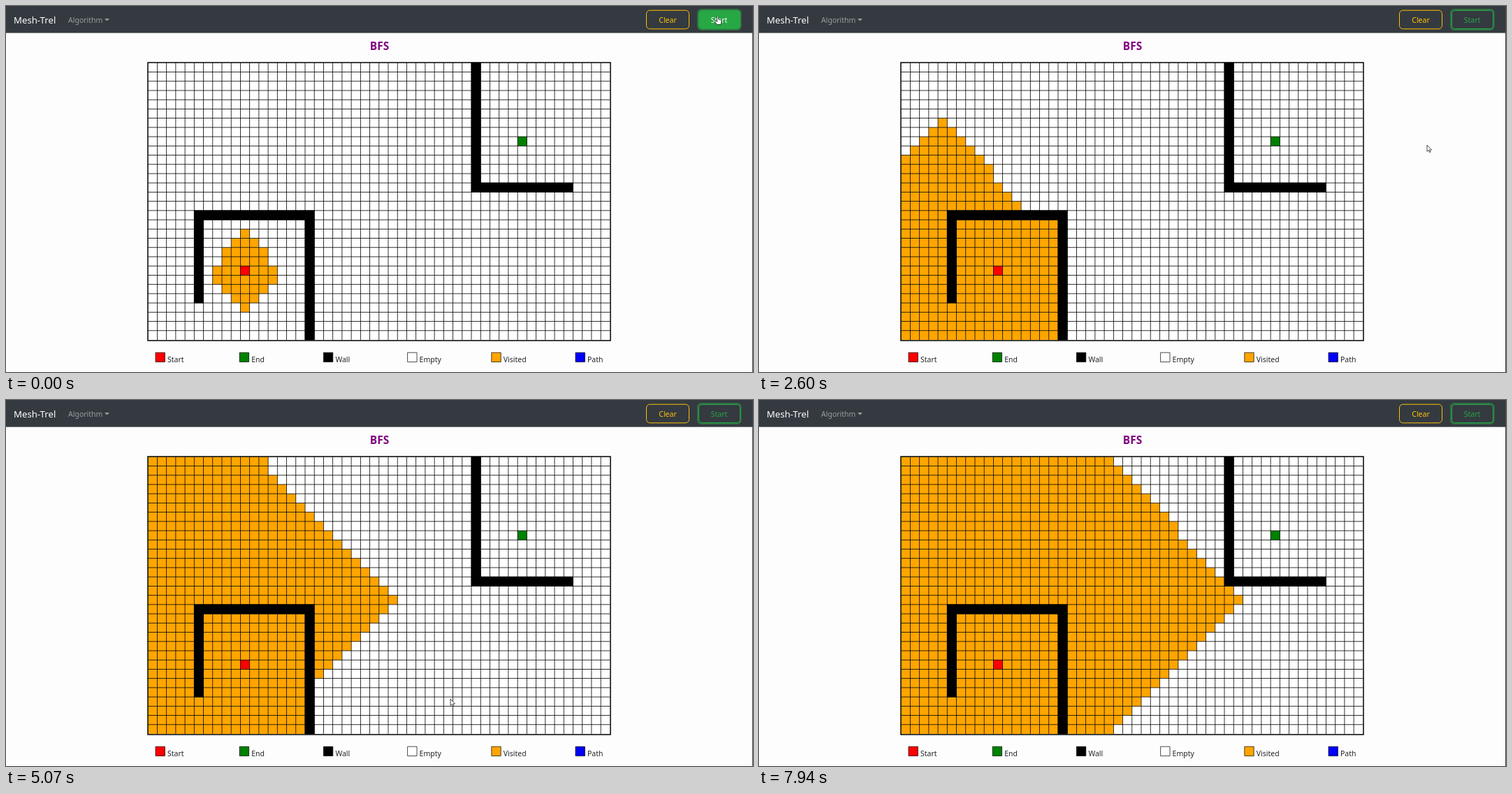
An HTML page with a canvas for the animation above (8 s loop, 1069 by 524 pixels).

```html
<!DOCTYPE html>
<html lang="en">
<head>
<meta charset="utf-8">
<title>Breadth-first search</title>
<style>
html, body { margin: 0; width: 100%; height: 100%; overflow: hidden; background: #fdfdfd; }
canvas { display: block; }
</style>
</head>
<body>
<canvas id="stage" width="1069" height="524"></canvas>
<script>
const ctx = document.getElementById('stage').getContext('2d');
const LOOP = 8000, TICK = 95.5;
const COLS = 50, ROWS = 30, SIZE = 13.223;
const LEFT = 203.2, TOP = 81.3, WIDTH = COLS * SIZE, HEIGHT = ROWS * SIZE;
const START = [22, 10], END = [8, 40];
const FONT = '"Noto Sans", "Open Sans", sans-serif';
const GREEN = '#28a745', YELLOW = '#ffc107', MUTED = '#9a9da0';

const isWall = (r, c) =>
  (r === 16 && c >= 5 && c <= 17) || (c === 5 && r >= 16 && r <= 25) ||
  (c === 17 && r >= 16) || (c === 35 && r <= 13) ||
  (r === 13 && c >= 35 && c <= 45);

// Cells in the order the search visits them: down, up, right, left
function search() {
  const queue = [START], seen = new Set([START.join()]);
  for (const [r, c] of queue) {
    for (const [y, x] of [[r + 1, c], [r - 1, c], [r, c + 1], [r, c - 1]]) {
      const key = y + ',' + x;
      if (y < 0 || x < 0 || y >= ROWS || x >= COLS || isWall(y, x) || seen.has(key)) continue;
      seen.add(key);
      queue.push([y, x]);
    }
  }
  return queue;
}
const order = search();

// Key points by tick: visited cells, and the pointer tip
const progress = [[0, 37], [10, 128], [27, 298], [43, 463], [53, 566], [69, 716], [83, 858]];
const pointer = [[2, 1017.5, 14], [7, 956, 199], [46, 956, 199], [53, 636, 428], [55, 598, 474]];
const POINTER_HIDES = 74;

function sample(keys, tick) {
  const next = keys.findIndex(k => k[0] >= tick);
  if (next < 1) return keys.at(next).slice(1);
  const a = keys[next - 1], b = keys[next], f = (tick - a[0]) / (b[0] - a[0]);
  return a.slice(1).map((v, i) => v + (b[i + 1] - v) * f);
}

function text(str, x, y, size, color, align = 'left', weight = 400) {
  ctx.font = `${weight} ${size}px ${FONT}`;
  ctx.textAlign = align;
  ctx.fillStyle = color;
  ctx.fillText(str, x, y);
}

function rect(x, y, w, h, color) {
  ctx.fillStyle = color;
  ctx.fillRect(x, y, w, h);
}

function box(x, y, w, h, radius, stroke, width, fill) {
  ctx.beginPath();
  ctx.roundRect(x, y, w, h, radius);
  if (fill) { ctx.fillStyle = fill; ctx.fill(); }
  ctx.strokeStyle = stroke;
  ctx.lineWidth = width;
  ctx.stroke();
}

function cell(r, c, color, pad = 0) {
  rect(LEFT + c * SIZE - pad, TOP + r * SIZE - pad, SIZE + 2 * pad, SIZE + 2 * pad, color);
}

function drawBar(hover) {
  rect(0, 0, 1069, 38.6, '#343a40');
  text('Mesh-Trel', 11, 25, 13.2, '#fff');
  text('Algorithm', 89, 24, 10.5, MUTED);
  ctx.fill(new Path2D('M141 18h7l-3.5 3.5z'));
  box(916.5, 6.2, 61, 26.6, 5, YELLOW, 1);
  text('Clear', 947, 24, 10.5, YELLOW, 'center');
  box(990, 5, 61.5, 29, 5, 'rgba(40,167,69,.5)', 2.2);
  box(991.5, 6.5, 59, 26, 4, GREEN, 1, hover && GREEN);
  text('Start', 1020.5, 24, 10.5, hover ? '#fff' : GREEN, 'center');
}

function drawGrid(count) {
  rect(LEFT, TOP, WIDTH, HEIGHT, '#fff');
  for (const [r, c] of order.slice(0, count)) cell(r, c, 'orange');
  cell(...START, 'red');
  cell(...END, 'green');
  for (let r = 0; r < ROWS; r++)
    for (let c = 0; c < COLS; c++) if (isWall(r, c)) cell(r, c, '#000', .4);
  for (let c = 1; c < COLS; c++) rect(LEFT + c * SIZE - .4, TOP, .8, HEIGHT, '#000');
  for (let r = 1; r < ROWS; r++) rect(LEFT, TOP + r * SIZE - .4, WIDTH, .8, '#000');
  box(203, 80.9, 662, 398, 0, '#000', 1.5);
}

function drawLegend() {
  const items = { Start: 'red', End: 'green', Wall: '#000', Empty: '#fff', Visited: 'orange', Path: 'blue' };
  Object.entries(items).forEach(([name, color], i) => {
    const x = 214 + i * 120.2;
    box(x, 496.2, 13.4, 13.4, 0, '#000', .7, color);
    text(name, x + 17, 509.5, 10.5, '#212529');
  });
}

const ARROW = new Path2D('M0 0V9.4L2.2 7.4L3.7 10.6L5 10L3.6 7H6.5Z');
const HAND = new Path2D('M0 1Q1 -.5 2 1V5L5.5 6Q6.8 6.4 6.5 8L5.5 12.5H0L-3 8.5Q-3.2 7 -1.7 7.3L0 8.5Z');

function drawPointer(x, y, shape) {
  ctx.save();
  ctx.translate(x, y);
  ctx.fillStyle = '#fff';
  ctx.strokeStyle = '#222';
  ctx.lineWidth = .8;
  ctx.fill(shape);
  ctx.stroke(shape);
  ctx.restore();
}

function draw(time) {
  const tick = Math.floor(time / TICK);
  const [x, y] = sample(pointer, tick);
  const hover = y < 33;
  rect(0, 0, 1069, 524, '#fdfdfd');
  drawBar(hover);
  text('BFS', 534.5, 62.5, 15.4, 'purple', 'center', 600);
  drawGrid(Math.round(sample(progress, tick)[0]));
  drawLegend();
  rect(1068, 0, 1, 524, '#444');
  if (tick < POINTER_HIDES) drawPointer(x, y, hover ? HAND : ARROW);
}

const began = performance.now();
function animate() {
  draw((performance.now() - began) % LOOP);
  requestAnimationFrame(animate);
}
animate();
</script>
</body>
</html>
```
